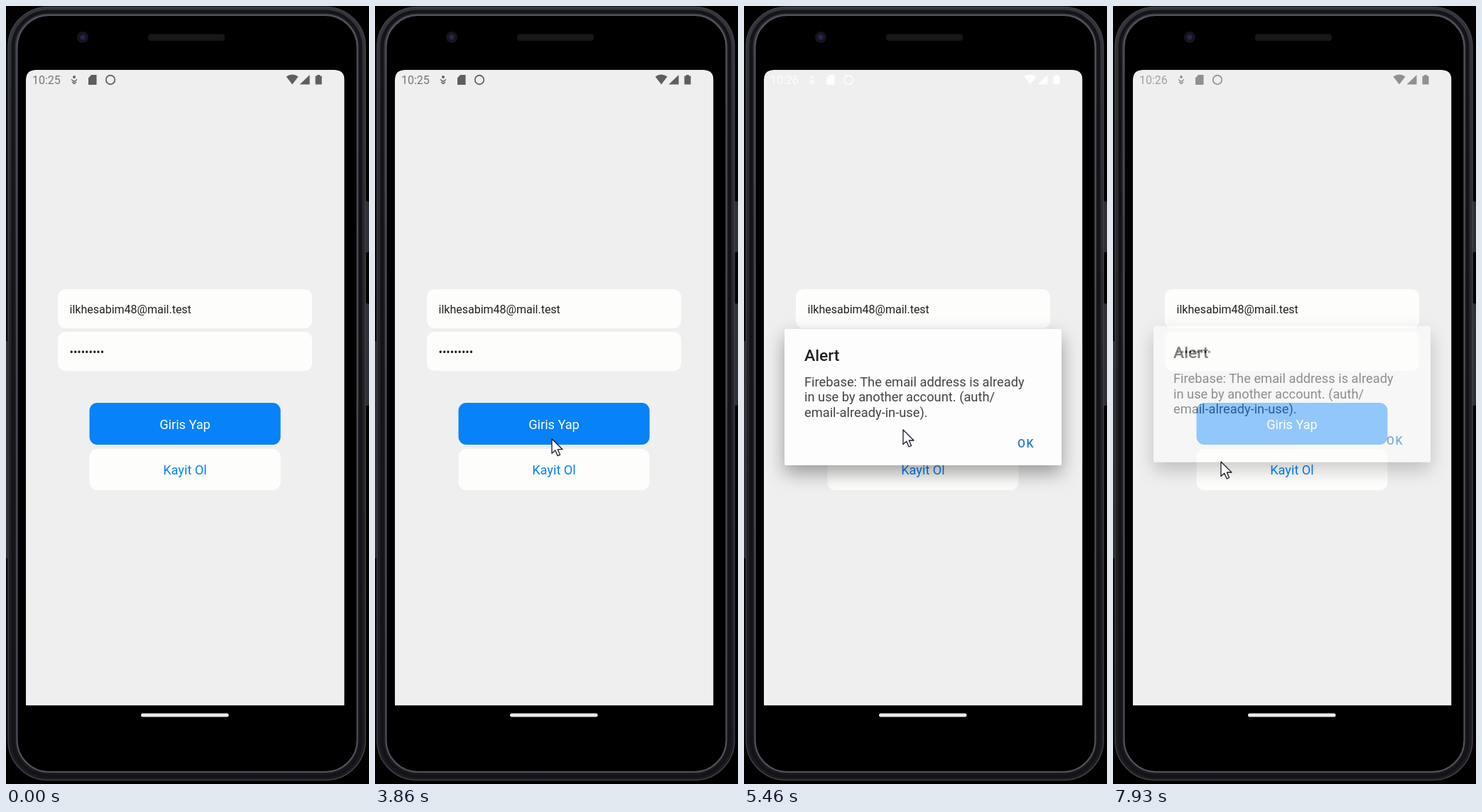
Recreate the animation shown at these times as an HTML page. Size 511 by 1096 pixels, loop 8000 ms.

```html
<!DOCTYPE html>
<html lang="tr">
<head>
<meta charset="utf-8">
<title>Giris</title>
<style>
  html, body { margin: 0; width: 100%; height: 100%; overflow: hidden; background: #000; }
  svg { display: block; width: 100vw; height: 100vh; font-family: Roboto, "Open Sans", sans-serif; }
  .card { fill: #fdfdfb; }
  .shadow { filter: drop-shadow(0 11px 13px rgba(0, 0, 0, .36)); }
</style>
</head>
<body>
<svg viewBox="0 0 511 1096">
  <defs>
    <path id="glass" d="M28 985.5V104Q28 90 42 90H462.500Q476.500 90 476.500 104V985.5Z"/>
    <clipPath id="screen"><use href="#glass"/></clipPath>
    <linearGradient id="metal" x2="0" y2="1">
      <stop offset="0" stop-color="#34343b"/>
      <stop offset=".5" stop-color="#222227"/>
      <stop offset="1" stop-color="#1b1b20"/>
    </linearGradient>
  </defs>

  <!-- phone body -->
  <rect width="511" height="1096"/>
  <g fill="#303034">
    <rect x="504" y="275" width="7" height="72" rx="2"/>
    <rect x="504" y="419" width="7" height="144" rx="2"/>
    <rect y="472" width="2" height="306"/>
  </g>
  <rect x="3" y="1.500" width="503" height="1089" rx="56" fill="url(#metal)" stroke="#3f3f48" stroke-width="1.500"/>
  <rect x="10" y="8" width="489" height="1077" rx="50" fill="none" stroke="#141418" stroke-width="5"/>
  <rect x="15.500" y="13" width="479" height="1066" rx="45" fill="#000" stroke="#53535e" stroke-width="2"/>
  <rect x="200" y="39.500" width="108" height="9.500" rx="4" fill="#17171a"/>
  <circle cx="108" cy="44" r="8" fill="#15151b"/>
  <circle cx="108" cy="44" r="3.500" fill="#242850"/>
  <rect x="190" y="996.500" width="123.500" height="5" rx="2.500" fill="#ececec"/>

  <g clip-path="url(#screen)">
    <use href="#glass" fill="#efefef"/>

    <!-- status bar -->
    <text id="clock" x="37" y="110" font-size="16"></text>
    <g id="icons">
      <circle cx="96" cy="100" r="1.900"/>
      <path d="M92 103.500L96 106.500 100 103.500M93 107L96 109.500 99 107" fill="none" stroke="currentColor" stroke-width="1.500"/>
      <path d="M116 101.500L120 97H127.500V111H116Z"/>
      <circle cx="147" cy="104" r="6.300" fill="none" stroke="currentColor" stroke-width="1.700"/>
      <path d="M394.500 99.500Q403 93.500 411.500 99.500L403 110.500Z"/>
      <path d="M413.500 110.500L427.500 97V110.500Z"/>
      <path d="M435.500 98.500H438V97H442V98.500H444.500V110.500H435.500Z"/>
    </g>

    <!-- login form -->
    <rect class="card" x="73" y="399" width="358" height="55" rx="11"/>
    <rect class="card" x="73" y="459" width="358" height="55" rx="11"/>
    <g font-size="16" fill="#202020">
      <text x="89.500" y="432.500">ilkhesabim48@mail.test</text>
      <text x="89.500" y="493">•••••••••</text>
    </g>
    <rect x="117.500" y="559" width="269" height="59" rx="11" fill="#0782f9"/>
    <rect class="card" x="117.500" y="624" width="269" height="58" rx="11"/>
    <g font-size="18.200" text-anchor="middle">
      <text x="252" y="596" fill="#fff">Giris Yap</text>
      <text x="252" y="660" fill="#0782f9">Kayit Ol</text>
    </g>

    <!-- dialog -->
    <g id="alert">
      <rect class="shadow" x="57" y="455" width="390" height="192" rx="2" fill="#fdfdfd"/>
      <text x="85" y="500" font-size="22.800" font-weight="500" fill="#202020">Alert</text>
      <g font-size="18.300" fill="#444">
        <text x="85" y="535.500">Firebase: The email address is already</text>
        <text x="85" y="557">in use by another account. (auth/</text>
        <text x="85" y="578.500">email-already-in-use).</text>
      </g>
      <text x="385" y="622" font-size="16" font-weight="500" letter-spacing="1.400" fill="#2f7cc4">OK</text>
    </g>
  </g>

  <path id="cursor" d="M0 0V20.500L4.800 16.200 8.200 24 11.600 22.500 8.300 15H15Z"
        fill="#fff" stroke="#1c1c28" stroke-width="1.300" stroke-linejoin="round"/>
</svg>

<script>
  const LOOP = 8000, STEP = 1000 / 15;
  const ENTER = [5250, 5450], LEAVE = [7866, 8020];
  // pointer stops: time, x, y
  const PATH = [
    [1260, 500, 160], [1600, 282, 291], [2060, 225, 470], [2866, 189, 585],
    [2933, 204, 590], [3300, 236, 495], [3800, 250, 605], [4133, 240, 650],
    [4600, 240, 650], [4866, 357, 622], [5170, 250, 640], [5466, 224, 597],
    [6260, 371, 604], [6400, 379, 608], [6600, 379, 608], [6800, 383, 614],
    [7200, 383, 614], [7330, 386, 613], [7730, 386, 613], [7933, 152, 642],
    [8000, 140, 645]
  ];

  const $ = id => document.getElementById(id);
  const clock = $('clock'), icons = $('icons'), dialog = $('alert'), cursor = $('cursor');
  const ramp = (t, [from, to]) => Math.min(1, Math.max(0, (t - from) / (to - from)));
  const mix = (a, b, k) => a + (b - a) * k;
  const grey = v => `rgb(${[v, v, v].map(Math.round)})`;

  function pointerAt(t) {
    const next = PATH.findIndex(p => p[0] > t);
    if (next < 1) return PATH[PATH.length - 1].slice(1);
    const a = PATH[next - 1], b = PATH[next];
    const k = ramp(t, [a[0], b[0]]), eased = k * k * (3 - 2 * k);
    return [mix(a[1], b[1], eased), mix(a[2], b[2], eased)];
  }

  function draw(time) {
    const t = Math.floor((time % LOOP + 7) / STEP) * STEP;

    const shown = ramp(t, ENTER) * (1 - ramp(t, LEAVE));
    dialog.setAttribute('opacity', shown);
    dialog.setAttribute('transform', `translate(0 ${-10 * (1 - shown)})`);

    const fade = shown * shown;
    clock.textContent = t < 5200 ? '10:25' : '10:26';
    clock.setAttribute('fill', grey(mix(118, 253, fade)));
    icons.style.color = icons.style.fill = grey(mix(94, 253, fade));

    const visible = t >= PATH[0][0];
    cursor.setAttribute('visibility', visible ? 'visible' : 'hidden');
    if (visible) cursor.setAttribute('transform', `translate(${pointerAt(t)})`);
  }

  const start = performance.now();
  function tick() {
    draw(performance.now() - start);
    requestAnimationFrame(tick);
  }
  tick();
</script>
</body>
</html>
```
